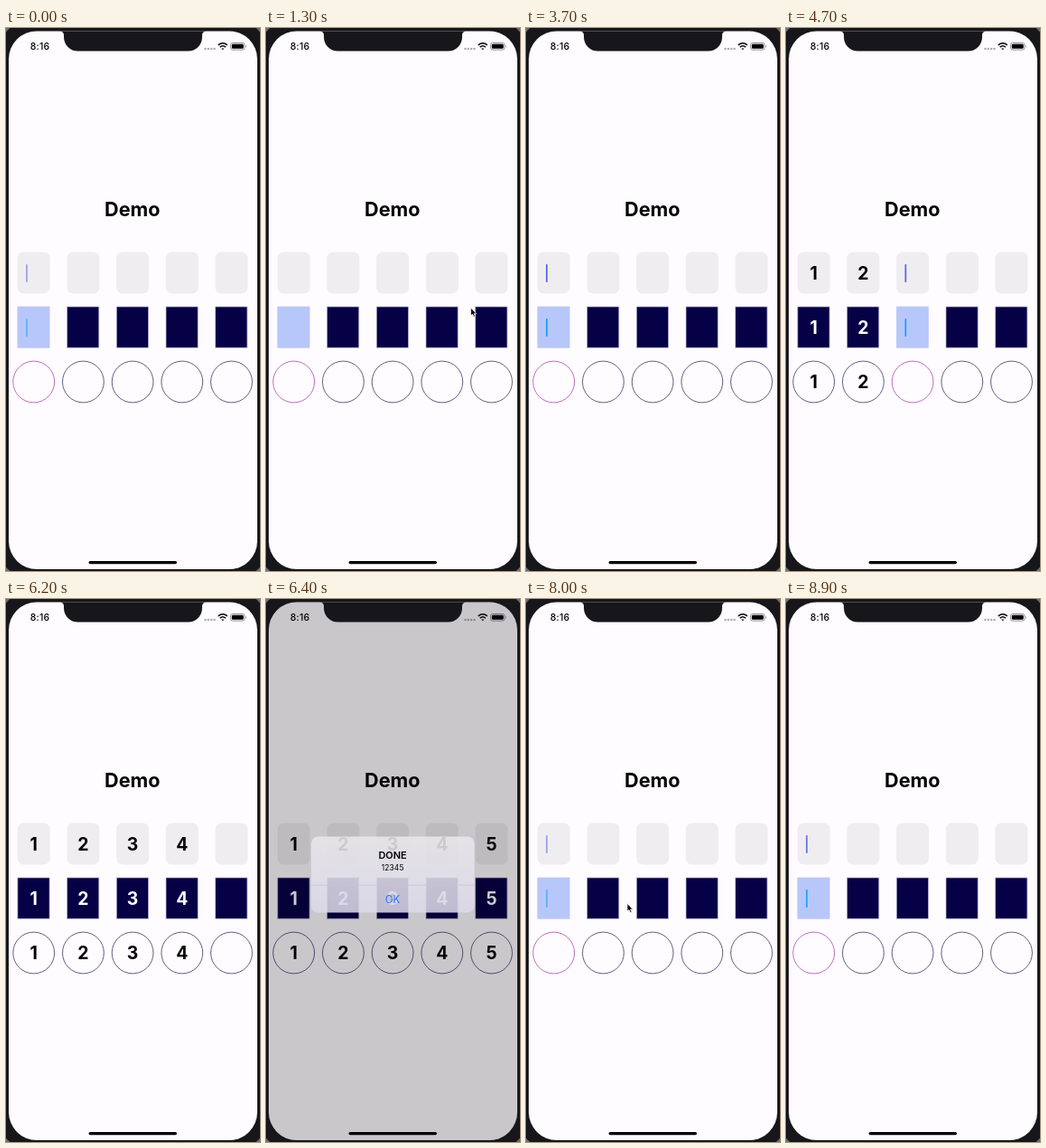
An HTML page that plays this animation: 281 px wide and 600 px high, repeating every 9 s.

```html
<!DOCTYPE html>
<html lang="en">
<head>
<meta charset="utf-8">
<title>Code entry demo</title>
<style>
  html, body { margin: 0; width: 100%; height: 100%; overflow: hidden; background: #6d6c70; }
  svg { display: block; width: 281px; height: 600px; font-family: Inter, sans-serif; font-optical-sizing: none; }
  text { text-anchor: middle; }
  .digit { font-size: 19.4px; font-weight: 700; }
</style>
</head>
<body>
<svg viewBox="0 0 281 600">
  <defs>
    <linearGradient id="glass" x1="0" y1="0" x2="0" y2="1">
      <stop offset="0" stop-color="#e9e7eb" stop-opacity=".88"/>
      <stop offset="1" stop-color="#dddaeb" stop-opacity=".86"/>
    </linearGradient>
  </defs>
  <rect x="-9" y="-9" width="299" height="618" rx="38" fill="#17161a"/>
  <rect x="3" y="3.4" width="275" height="594.6" rx="31" fill="#fefcfe"/>

  <text x="37.6" y="24.2" font-size="10.5" font-weight="500" letter-spacing=".2">8:16</text>
  <g id="signal" fill="#aaa8ac"></g>
  <g fill="none" stroke="#000" stroke-width="1.5">
    <path d="M234.8 18.9Q239.8 14.7 244.8 18.9M236.7 21.1Q239.8 18.5 242.9 21.1"/>
    <path d="M238.2 22.4H241.4L239.8 24.2Z" fill="#000" stroke="none"/>
    <rect x="248.5" y="16.5" width="15.5" height="7.6" rx="2.2" stroke="#77757a" stroke-width=".8"/>
  </g>
  <rect x="249.8" y="17.8" width="12.9" height="5" rx="1.2"/>
  <path d="M265 18.8Q266.4 20.3 265 21.8Z" fill="#77757a"/>

  <text x="139.8" y="208.2" font-size="21.6" font-weight="700">Demo</text>
  <g id="fields"></g>

  <rect id="dim" x="3" y="3.4" width="275" height="594.6" rx="31" fill="#08000c"/>
  <path d="M59 3.4Q64 3.4 64 8V10A15.5 15.5 0 0 0 79.5 25.5H201.5A15.5 15.5 0 0 0 217 10V8Q217 3.4 222 3.4Z" fill="#17161a"/>
  <rect x="91.5" y="588.9" width="97.5" height="3.3" rx="1.6"/>

  <g id="alert">
    <rect x="51" y="263" width="178.5" height="83" rx="8" fill="url(#glass)"/>
    <path d="M51 316H229.5" stroke="#c6c4d4" stroke-width=".7"/>
    <text x="140" y="287" font-size="10.8" font-weight="600">DONE</text>
    <text x="140.1" y="300.1" font-size="8.3" letter-spacing=".15">12345</text>
    <text x="140" y="335.2" font-size="11.4" fill="#2f74f2">OK</text>
  </g>
  <path id="pointer" d="M0 0V8.6L2 6.9L3.4 10L4.9 9.3L3.5 6.4H6.2Z" stroke="#fff" stroke-width=".7"/>
</svg>
<script>
const LOOP = 9000, STEP = 100, FIELDS = 5;
const TYPE_START = 3950, TYPE_GAP = 565;
const ALERT_AT = 6200, TAP_AT = 7800;

const $ = id => document.getElementById(id);
const clamp = v => Math.min(1, Math.max(0, v));
const mix = (a, b, u) => a + (b - a) * u;
const ramp = (t, from, length) => clamp((t - from) / length);
const smooth = u => u * u * (3 - 2 * u);

function set(el, attrs) {
  for (const name in attrs) el.setAttribute(name, attrs[name]);
}

function add(parent, tag, attrs) {
  const el = document.createElementNS("http://www.w3.org/2000/svg", tag);
  set(el, attrs);
  parent.append(el);
  return el;
}

for (let i = 0; i < 4; i++) add($("signal"), "circle", { cx: 220.5 + 3.35 * i, cy: 23, r: 1.2 });

function makeField(i) {
  const x = 30.7 + 54.7 * i;
  const put = (tag, attrs) => add($("fields"), tag, attrs);
  const digit = (y, fill) => {
    const el = put("text", { x, y, fill, class: "digit" });
    el.textContent = i + 1;
    return el;
  };
  const caret = (y, fill) => put("rect", { x: x - 8.6, y, width: 1.7, height: 20, rx: .8, fill });

  put("rect", { x: x - 18, y: 247.5, width: 36, height: 46, rx: 7, fill: "#f0edf0" });
  return {
    square: put("rect", { x: x - 17.8, y: 308, width: 35.2, height: 45.2, "stroke-width": .7 }),
    circle: put("circle", { cx: x, cy: 391, r: 22.9, fill: "none", "stroke-width": .75 }),
    digits: [digit(278, "#000"), digit(338.2, "#fff"), digit(398.3, "#000")],
    carets: [caret(261, "#4c60ee"), caret(321, "#0c9dfb")]
  };
}
const fields = Array.from({ length: FIELDS }, (_, i) => makeField(i));

// First visit: an arc leaving on the left. Second: up to the OK button and back down.
function pointerAt(t) {
  if (t < 5000) {
    const u = ramp(t, 400, 2200), bow = Math.sin(Math.PI * u);
    return [mix(209, -6, u) + 110 * bow, mix(402, 316, u) - 60 * bow, u > 0 && t <= 2600];
  }
  const near = smooth(ramp(t, 7100, 600)) - smooth(ramp(t, 8200, 600));
  return [112, mix(602, 336.5, near), near > 0];
}

function draw(t) {
  const live = t <= TAP_AT;
  const count = live ? Math.min(FIELDS, Math.max(0, Math.floor((t - TYPE_START) / TYPE_GAP) + 1)) : 0;
  const focus = live && t >= ALERT_AT ? -1 : count;
  const blink = clamp(.45 + .6 * Math.cos(2 * Math.PI * (t / 1000 - .78)));

  fields.forEach(({ square, circle, digits, carets }, i) => {
    const active = i === focus;
    set(square, { fill: active ? "#b8c7f9" : "#060046", stroke: active ? "#b8c7f9" : "#b9b5d2" });
    set(circle, { stroke: active ? "#a63fad" : "#2e2b5c" });
    digits.forEach(el => set(el, { opacity: i < count ? 1 : 0 }));
    carets.forEach(el => set(el, { opacity: active ? blink : 0 }));
  });

  const shown = ramp(t, ALERT_AT, 200) - ramp(t, TAP_AT, 200);
  const scale = 1 + .2 * (1 - ramp(t, ALERT_AT, 400)) ** 4;
  set($("dim"), { opacity: .213 * shown });
  set($("alert"), {
    opacity: shown,
    transform: `translate(140.2 304.5) scale(${scale}) translate(-140.2 -304.5)`
  });

  const [x, y, visible] = pointerAt(t);
  set($("pointer"), { opacity: visible ? 1 : 0, transform: `translate(${x} ${y})` });
}

// The picture advances in steps of a tenth of a second.
const start = performance.now();
function tick() {
  const t = (performance.now() - start) % LOOP;
  draw(Math.floor(t / STEP) * STEP);
  requestAnimationFrame(tick);
}
tick();
</script>
</body>
</html>
```
